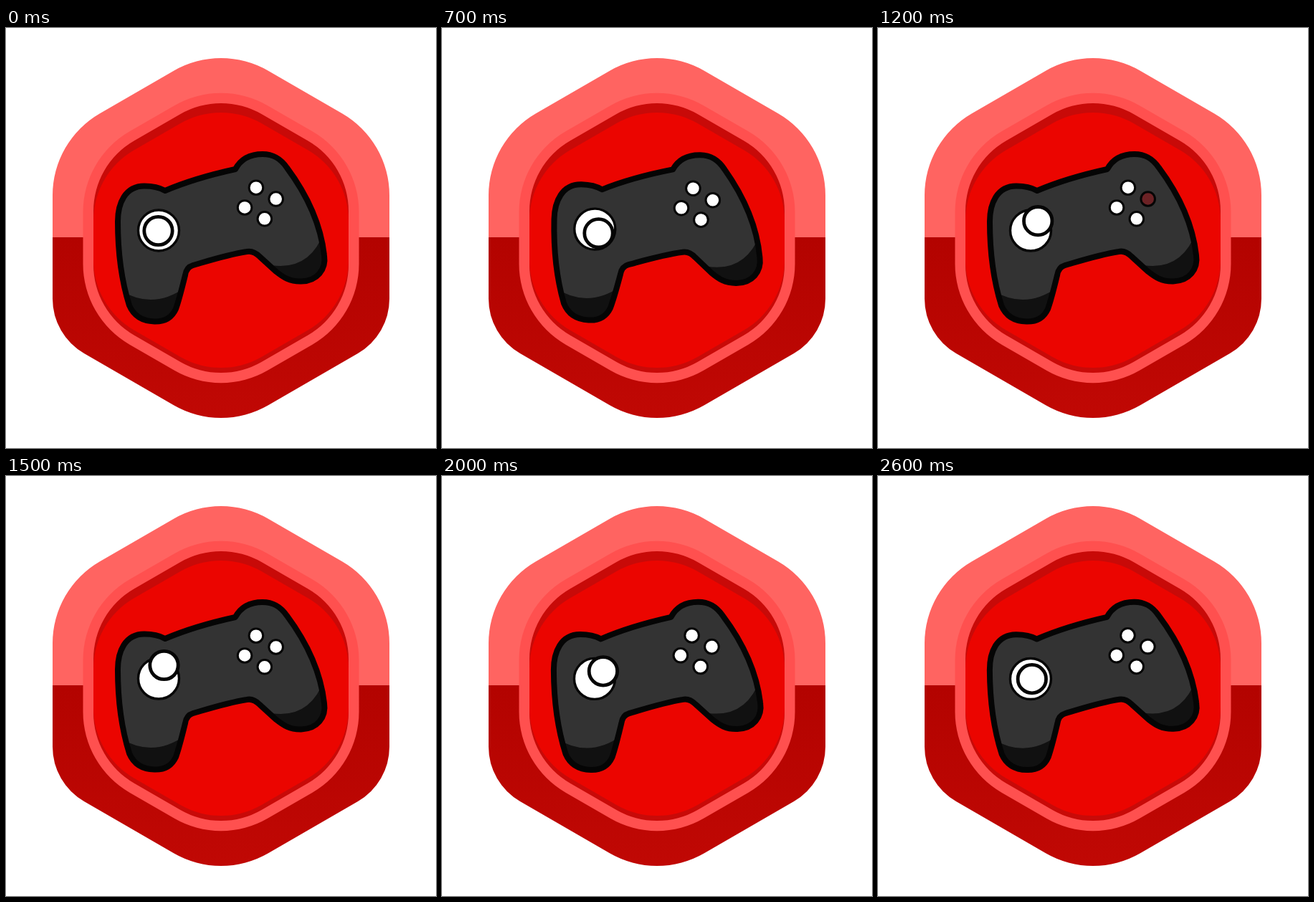
An HTML page with a canvas for the animation above (2.7 s loop, 600 by 586 pixels).

```html
<!DOCTYPE html>
<html lang="en">
<head>
<meta charset="utf-8">
<title>Game controller badge</title>
<style>
  html, body { margin: 0; width: 100%; height: 100%; overflow: hidden; background: #fff; }
  canvas { display: block; }
</style>
</head>
<body>
<canvas id="stage" width="600" height="586"></canvas>
<script>
const ctx = document.getElementById('stage').getContext('2d');
const LOOP = 2700, STEP = 100, BEAT = 450;
const CX = 300, CY = 293, SPLIT = 292;
const INK = '#050505';

// One pose per beat: tilt in degrees, stick offset in pixels
const REST = [0, 0], LEFT = [-11.5, 6.5], RIGHT = [18.5, 1], UP = [8, -19];
const STICK = [REST, LEFT, RIGHT, UP, UP, RIGHT, REST];
const TILT = [0, 0.7, 1.6, -0.6, 1.6, -2.9, 0];

const BODY = new Path2D(`M156 270 C156 245 166 220.5 193 220.5 C205 220.5 213 222 222 227
  C250 215 288 204 320 197 C328 182 342 176 358 176 C373 176 383 182 392 195
  C418 230 439 273 444 317 C447 337 434 353 412 353.5 C396 354 387 348 377 340
  L354 319 C349 314 343 310.5 336 312 C310 316 285 324 261 331
  C254 333 251 338 250 345 C246 361 242 378 237 392 C231 405 221 410 207 409.5
  C190 409 178 401 172 387 C161 352 156 310 156 270Z`);
const GRIPS = new Path2D(`M160 366 Q205 394 250 362 V420 H160Z
  M370 331 Q424 339 444 284 H460 V365 H370Z`);

// Rounded hexagon: half width, upper and lower side radius, inward shift of top and bottom
function hexagon(half, r, low = r, top = 0, bottom = 0) {
  const path = new Path2D(), reach = half * 2 / Math.sqrt(3);
  const corner = i => {
    const a = (i * 60 - 90) * Math.PI / 180, dy = Math.sin(a) * reach;
    return [CX + Math.cos(a) * reach, CY + dy + (dy < 0 ? top : -bottom)];
  };
  const [ax, ay] = corner(5), [bx, by] = corner(0);
  path.moveTo((ax + bx) / 2, (ay + by) / 2);
  for (let i = 0; i < 6; i++) {
    path.arcTo(...corner(i), ...corner(i + 1), i === 2 || i === 4 ? low : r);
  }
  path.closePath();
  return path;
}

const OUTER = hexagon(235, 132, 88);
const RING = hexagon(192.5, 130);
const WELL = hexagon(178, 113);
const FACE = hexagon(178, 113, 113, 13, 7);

const shade = ctx.createLinearGradient(0, CY, 0, 544);
shade.addColorStop(0, '#b30300');
shade.addColorStop(1, '#c00804');

const mix = (a, b, u) => a + (b - a) * u;

function fill(path, color) {
  ctx.fillStyle = color;
  ctx.fill(path);
}

function disc(x, y, r, width, color) {
  ctx.beginPath();
  ctx.arc(x, y, r, 0, Math.PI * 2);
  ctx.fillStyle = color;
  ctx.fill();
  ctx.strokeStyle = INK;
  ctx.lineWidth = width;
  ctx.stroke();
}

function badge() {
  ctx.save();
  ctx.clip(OUTER);
  ctx.fillStyle = '#ff6461';
  ctx.fillRect(0, 0, 600, SPLIT);
  ctx.fillStyle = shade;
  ctx.fillRect(0, SPLIT, 600, 586 - SPLIT);
  ctx.restore();
  fill(RING, '#ff504f');
  fill(WELL, '#c80a08');
  ctx.save();
  ctx.clip(WELL);
  fill(FACE, '#eb0500');
  ctx.restore();
}

// Four buttons in a tilted diamond, pressed in turn clockwise from the top
function buttons(t) {
  for (let i = 0; i < 4; i++) {
    const a = (i * 90 - 105.3) * Math.PI / 180;
    const since = t - 300 - i * 620;
    const pressed = since >= 0 && since < 300;
    disc(354.9 + 22.6 * Math.cos(a), 244.5 + 22.6 * Math.sin(a), 9.8, 3,
      pressed ? '#6c2225' : '#fff');
  }
}

function pad(t) {
  const beat = Math.floor(t / BEAT), u = t / BEAT - beat;
  const ease = u * u * (3 - 2 * u);
  const [dx, dy] = REST.map((_, k) => mix(STICK[beat][k], STICK[beat + 1][k], ease));

  ctx.save();
  ctx.translate(CX, CY);
  ctx.rotate(mix(TILT[beat], TILT[beat + 1], ease) * Math.PI / 180);
  ctx.translate(-CX, -CY);
  fill(BODY, '#333');
  ctx.save();
  ctx.clip(BODY);
  fill(GRIPS, '#111');
  ctx.restore();
  ctx.strokeStyle = INK;
  ctx.lineJoin = 'round';
  ctx.lineWidth = 8;
  ctx.stroke(BODY);
  buttons(t);
  disc(213, 282.5, 28.5, 3.4, '#fff');
  ctx.restore();
  disc(212.5 + dx, 283 + dy, 19.7, 4.8, '#fff');
}

function draw(t) {
  ctx.fillStyle = '#fff';
  ctx.fillRect(0, 0, 600, 586);
  badge();
  pad(t);
}

const start = performance.now();
function tick() {
  const t = (performance.now() - start) % LOOP;
  draw(Math.floor(t / STEP) * STEP);
  requestAnimationFrame(tick);
}
tick();
</script>
</body>
</html>
```
